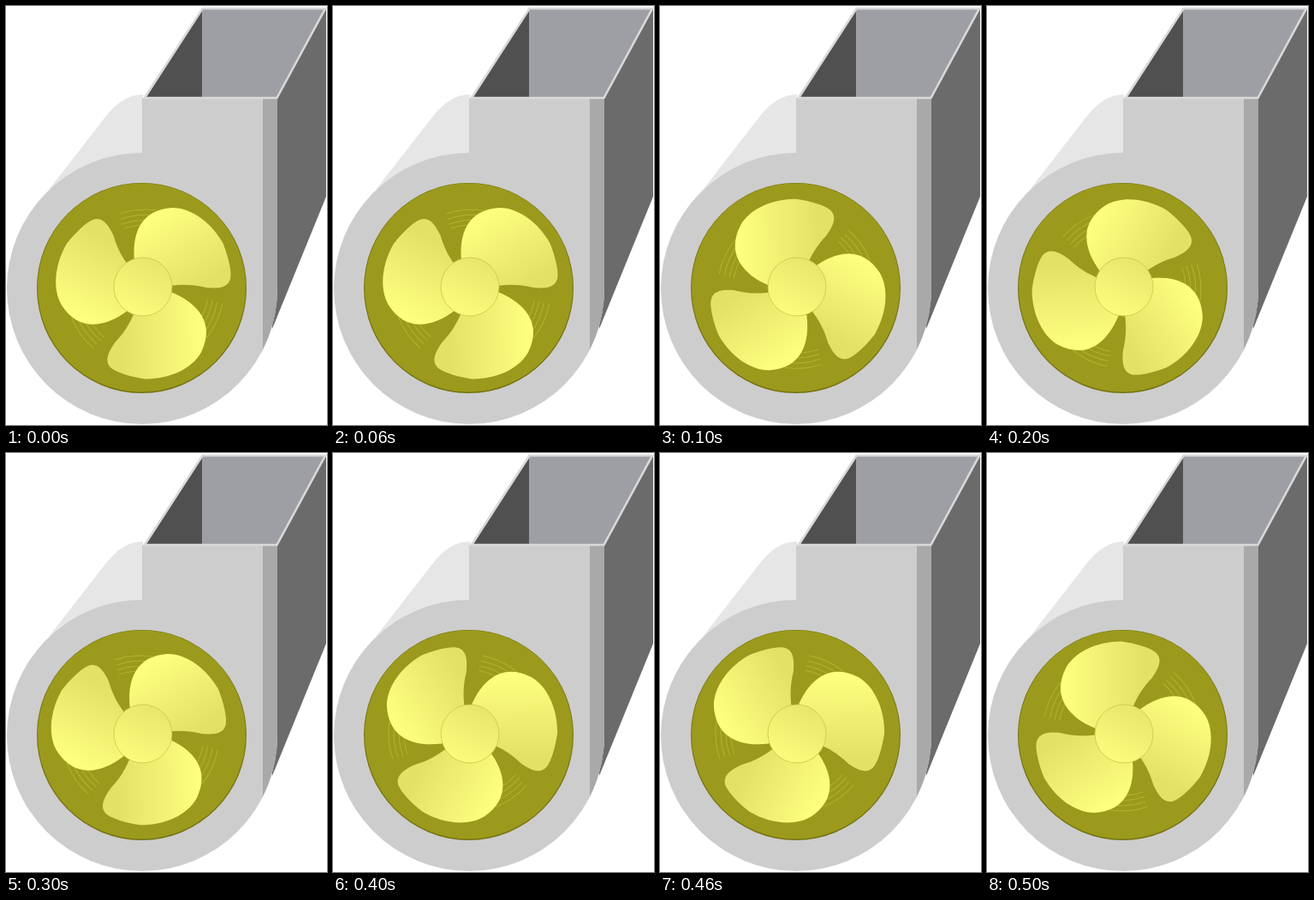
These frames come from a looping animation (375x488 px, 0.6 s). An HTML page:

```html
<!DOCTYPE html>
<html lang="en">
<head>
<meta charset="utf-8">
<title>Blower</title>
<style>
  html, body { margin: 0; width: 100%; height: 100%; overflow: hidden; background: #fff; }
  svg { display: block; }
</style>
</head>
<body>
<svg width="375" height="488" viewBox="0 0 375 488">
  <defs>
    <linearGradient id="bladeFill" x1=".15" y1=".1" x2=".75" y2=".9">
      <stop offset="0" stop-color="#ffff80"/>
      <stop offset="1" stop-color="#e4e266"/>
    </linearGradient>
    <linearGradient id="hubFill" x1=".75" y1="0" x2=".3" y2="1">
      <stop offset="0" stop-color="#e8e66a"/>
      <stop offset="1" stop-color="#fdfc7d"/>
    </linearGradient>
    <path id="blade" fill="url(#bladeFill)" d="M-12-30C-16-62-6-92 32-94C55-94 78-76 91-53C97-38 101-22 100-13C98 0 84 0 72-1C55-5 45-5 28-3L0 0Z"/>
    <path id="streaks" fill="none" stroke="#b4b22c" d="M-30-87A92 92 0 0 1 14-91M-28-81A86 86 0 0 1 13-85M-27-75A80 80 0 0 1 12-79M-25-70A74 74 0 0 1 11-73"/>
  </defs>

  <!-- housing and duct -->
  <path fill="#e6e6e6" d="M50 214L117 128Q137 103 160 103V180Z"/>
  <path fill="#6b6b6b" d="M316 107L374 3V222L311 376Z"/>
  <path fill="#a9a9a9" d="M299 107H317V329Q317 366 299 402Z"/>
  <circle cx="159" cy="329" r="158" fill="#cdcdcd"/>
  <path fill="#cdcdcd" d="M159 107H300V400L159 329Z"/>
  <path fill="#a9a9a9" d="M300 107H317V329Q317 366 300 400Z"/>
  <path fill="#9e9fa4" d="M229 3H374L317 107H229Z"/>
  <path fill="#505050" d="M161 107L229 3V107Z"/>
  <path fill="none" stroke="#d9d9d9" stroke-width="2.6" d="M162 107L229.500 3H373L316.500 107Z"/>

  <!-- fan -->
  <circle cx="158.500" cy="328.500" r="122.500" fill="#74720f"/>
  <circle cx="158.500" cy="328" r="121.500" fill="#9c9a1c"/>
  <g id="fan"></g>
  <circle cx="160" cy="327" r="34" fill="url(#hubFill)" stroke="#c9c748" stroke-width=".8"/>
</svg>
<script>
  const fan = document.getElementById('fan');
  const angles = [0, 60, 90, 120, 150, 180];
  const ring = id => [0, 120, 240].map(a => `<use href="#${id}" transform="rotate(${a})"/>`).join('');
  fan.innerHTML = ring('streaks') + ring('blade');

  // The blades sit slightly off the axle, so the fan wobbles as it turns.
  function draw() {
    const step = Math.floor(performance.now() / 100) % angles.length;
    fan.setAttribute('transform', `rotate(${angles[step]} 160 327) translate(162.4 329.1)`);
    requestAnimationFrame(draw);
  }
  draw();
</script>
</body>
</html>
```
